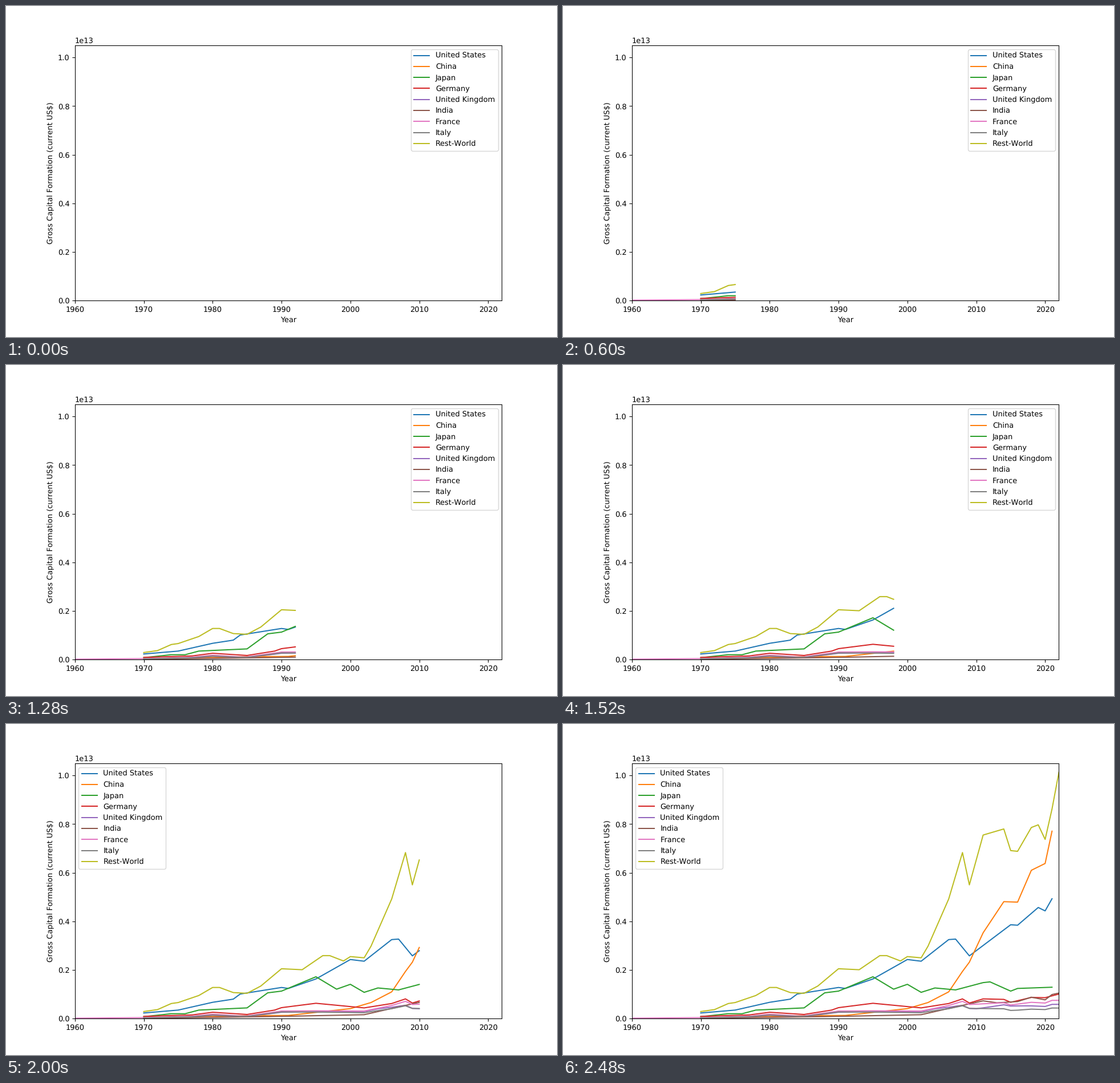
Animation of 966x580 px, one loop 2.52 s. Source, as a matplotlib script:

```python
import numpy as np
import matplotlib.pyplot as plt
from matplotlib.animation import FuncAnimation

WIDTH, HEIGHT, DPI = 966, 580, 96.6
FIRST, LAST = 1960, 2022
UNIT = 1e10  # curve values are in tens of billions of dollars

plt.rcParams["font.family"] = "DejaVu Sans"
plt.rcParams["text.hinting"] = "none"
plt.rcParams["text.hinting_factor"] = 1

# the small excess keeps the pixel size from rounding down
fig, ax = plt.subplots(figsize=((WIDTH + 1e-3) / DPI, (HEIGHT + 1e-3) / DPI), dpi=DPI)
fig.subplots_adjust(left=0.125, right=0.9, bottom=0.11, top=0.8805)
ax.set_xlim(FIRST, LAST)
ax.set_ylim(0, 1.049e13)
ax.set_xlabel("Year")
ax.set_ylabel("Gross Capital Formation (current US$)")

curves = []


def between(points, years):
    """Straight segments between a few turning points."""
    return np.interp(years, list(points), list(points.values()))


def add_curve(label, points, share=None, start=1970):
    """Add a yearly curve, optionally scaled by a share that drifts over time."""
    years = np.arange(start, max(points) + 1)
    values = between(points, years)
    if share:
        values = values * between(share, years)
    line, = ax.plot([], [], label=label)
    curves.append((line, years, values * UNIT))


america = {1970: 23, 1975: 35, 1980: 67, 1983: 80, 1984: 101, 1990: 128, 1991: 124,
           1995: 163, 2000: 243, 2002: 236, 2006: 325, 2007: 327, 2009: 258,
           2015: 386, 2016: 384, 2019: 457, 2020: 443, 2021: 493}
china = {1970: 3, 1985: 12, 1991: 13, 2000: 41, 2003: 66, 2006: 110, 2008: 194,
         2009: 232, 2011: 353, 2014: 481, 2016: 479, 2018: 610, 2020: 638, 2021: 771}
japan = {1970: 8, 1974: 20, 1976: 20, 1978: 35, 1985: 44, 1988: 106, 1990: 113,
         1995: 172, 1998: 121, 2000: 141, 2002: 108, 2004: 126, 2007: 118,
         2011: 148, 2012: 151, 2015: 113, 2016: 124, 2021: 129}
germany = {1970: 9, 1977: 15, 1980: 26, 1985: 17, 1989: 35, 1990: 45, 1995: 63,
           2002: 44, 2006: 62, 2008: 81, 2009: 64, 2011: 81, 2014: 79,
           2015: 67, 2018: 87, 2020: 86, 2022: 101}
india = {1970: 1, 1988: 8, 2002: 16, 2007: 48, 2011: 73, 2013: 65, 2016: 70,
         2018: 88, 2020: 77, 2021: 99, 2022: 105}
france = {1960: 1.6, 1970: 4, 1977: 9.5, 1980: 18, 1984: 11, 1985: 11, 1990: 31, 1995: 32,
          2002: 31, 2006: 54, 2008: 71, 2009: 58, 2014: 65, 2015: 56,
          2018: 67, 2020: 64, 2021: 75, 2022: 75}
rest = {1970: 29, 1972: 37, 1974: 62, 1975: 66, 1978: 95, 1980: 128, 1981: 128,
        1983: 107, 1985: 104, 1987: 134, 1990: 205, 1993: 201, 1996: 259, 1997: 259,
        1999: 237, 2000: 255, 2002: 250, 2003: 298, 2006: 492, 2008: 683, 2009: 550,
        2011: 755, 2014: 780, 2015: 691, 2016: 688, 2018: 786, 2019: 797,
        2020: 737, 2021: 862, 2022: 1013}

add_curve("United States", america)
add_curve("China", china)
add_curve("Japan", japan)
add_curve("Germany", germany)
add_curve("United Kingdom", france,
          share={1970: 0.68, 1985: 0.8, 2004: 0.95, 2010: 0.68, 2015: 0.92, 2018: 0.78})
add_curve("India", india)
add_curve("France", france, start=FIRST)
add_curve("Italy", france, share={1970: 0.75, 1990: 0.88, 2008: 0.74, 2016: 0.58})
add_curve("Rest-World", rest)

# the legend hops to the other corner once a curve runs into it
ax.legend(loc="best")


def update(step):
    """Reveal every curve up to the current year."""
    for line, years, values in curves:
        shown = years <= FIRST + step
        line.set_data(years[shown], values[shown])
    return [curve[0] for curve in curves]


anim = FuncAnimation(fig, update, frames=LAST - FIRST + 1, init_func=lambda: update(0),
                     interval=40, repeat=True, repeat_delay=0, blit=False)
plt.show()
```
